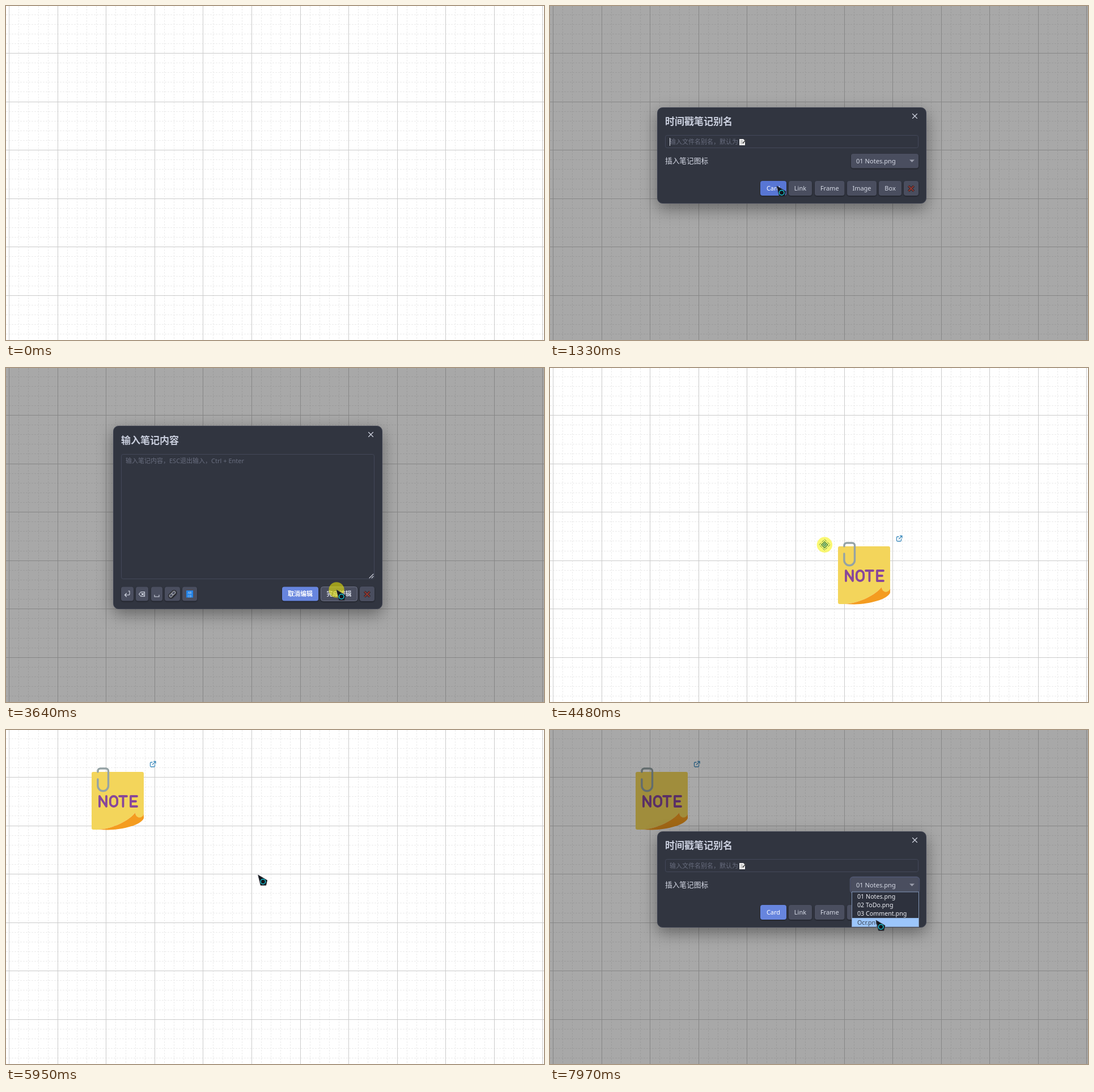
Write an HTML page that moves like this. It is 949 px wide and 590 px high and loops after 8 s.

```html
<!DOCTYPE html>
<html lang="zh">
<head>
<meta charset="utf-8">
<style>
html, body { margin: 0; width: 100%; height: 100%; overflow: hidden; background: #fff; }
svg { display: block; width: 949px; height: 590px; }
text { font: 11px "Noto Sans", "Noto Sans CJK SC", "Noto Sans CJK", sans-serif; fill: #d5d9e5; white-space: pre; }
.title { font-size: 17px; font-weight: 700; fill: #cbd0df; }
.label { font-size: 12.7px; font-weight: 500; }
.hint { fill: #686d7e; }
.btn text { font-weight: 500; text-anchor: middle; }
.btn rect { fill: #4a4e5f; filter: drop-shadow(0 1px 1px #0007); }
.btn.primary rect { fill: #6785de; }
.btn.primary text { fill: #fff; }
.btn.primary.hover rect { fill: #5876d4; }
.btn.outlined rect { stroke: #6b7084; }
.btn.bold text { font-weight: 700; }
.panel { fill: #313540; stroke: #3f4352; filter: drop-shadow(0 9px 14px #0006); }
.field { fill: none; stroke: #434859; }
.glow { fill: none; stroke: #50566f; stroke-width: 2.4; }
.icon { fill: none; stroke: #d5d9e5; stroke-width: 1.1; stroke-linecap: round; stroke-linejoin: round; }
.caret { stroke: #dfe2ea; }
</style>
</head>
<body>
<svg id="stage" viewBox="0 0 949 590"></svg>
<script>
const LOOP = 8000;
const FIRST_OPEN = 1260, EDIT_OPEN = 1890, EDIT_PRESS = 3570, EDIT_CLOSE = 3850;
const NOTE_IN = 4050, DRAG_START = 4390, DRAG_END = 4850, DESELECT = 5450;
const SECOND_OPEN = 6350, LIST_OPEN = 7270;
const OPTIONS = ['01 Notes.png', '02 ToDo.png', '03 Comment.png', 'Ocr.png'];

// time, x, y of the pointer tip
const PATH = [
  [70, 556, 500], [800, 386, 305], [1000, 388, 306], [1260, 400, 318], [2600, 400, 318],
  [3360, 548, 402], [3570, 583, 392], [3900, 583, 392], [4270, 555, 360], [DRAG_START, 555, 360],
  [DRAG_END, 198, 119], [5180, 198, 119], [5800, 446, 256], [5950, 444, 256], [6600, 868, 290],
  [6780, 868, 290], [6920, 737, 277], [7200, 600, 270], [7350, 600, 270], [7620, 588, 332],
  [7760, 580, 349], [7900, 575, 336], [LOOP, 575, 336]
];
const CLICKS = [[1660, 1820], [3580, 3760], [DRAG_START, DRAG_END + 40], [7200, 7330]];

const rect = (x, y, w, h, r, cls) =>
  `<rect x="${x}" y="${y}" width="${w}" height="${h}" rx="${r}" class="${cls || ''}"/>`;
const text = (x, y, str, cls = '') => `<text x="${x}" y="${y}" class="${cls}">${str}</text>`;
const path = (d, attrs) => `<path d="${d}" ${attrs}/>`;
const icon = d => path(d, 'class="icon"');
const button = (x, y, w, h, content, cls = '', id = '') => `<g class="btn ${cls}" id="${id}">
  ${rect(x, y, w, h, 4)}${content[0] === '<' ? content : text(x + w / 2, y + h / 2 + 4, content)}</g>`;
const cross = (x, y, r) => `M${x - r} ${y - r}l${2 * r} ${2 * r}M${x + r} ${y - r}l${-2 * r} ${2 * r}`;
const redCross = (y, id) => button(624, y, 26, 26,
  `<g id="${id}" stroke="#8e3833">${path(cross(637, y + 13.5, 4.7), 'stroke="#2b2224" stroke-width="4"')}
  ${path(cross(637, y + 13.5, 4.5), 'stroke-width="2.2"')}</g>`);

function gridLines(step) {
  let d = '';
  for (let x = 5.7 - 85.55; x < 949; x += step) d += `M${Math.floor(x) + .5} 0V590`;
  for (let y = 83.5 - 85.55; y < 590; y += step) d += `M0 ${Math.floor(y) + .5}H949`;
  return d;
}

const grid = path(gridLines(17.11), 'stroke="#ebebeb" stroke-dasharray="3 2"') +
  path(gridLines(85.55), 'stroke="#cbcbcb"');

const foldEdge = 'C190 174 217 160 228 146';
const note = `<g id="note">
  ${path('M154 74H240a3 3 0 0 1 3 3V148C241 158 229 157 228 146C217 160 190 174 163 176H154a3 3 0 0 1-3-3V77a3 3 0 0 1 3-3z', 'fill="#f3d55b"')}
  ${path(`M163 176${foldEdge}C229 157 241 157 243 148V156C238 168 206 176 180 176.5z`, 'fill="#f49c20"')}
  <g fill="none" stroke-linecap="round" stroke-linejoin="round">
  ${path('M162 74V72.5a4.5 4.5 0 0 1 4.5-4.5H176a4.5 4.5 0 0 1 4.5 4.5V98.5a9.3 9.3 0 0 1-18.6 0V87', 'stroke="#95a3a5" stroke-width="3.4"')}
  ${path('M165 135V117L177 135V117M190 117a6.2 6.2 0 0 1 6.2 6.2v5.6a6.2 6.2 0 0 1-12.4 0v-5.6a6.2 6.2 0 0 1 6.2-6.2M200 117H213M206.5 117V135M231 117H220V135H231M220 126H229', 'stroke="#88479a" stroke-width="3.8"')}
  ${path('M258 57H256a1.5 1.5 0 0 0-1.5 1.5V63.500a1.500 1.500 0 0 0 1.500 1.500H261a1.500 1.500 0 0 0 1.500-1.500V61M260.500 55.500H264V59M264 55.500L258.500 61', 'stroke="#3d8bbd" stroke-width="1.3"')}
  </g>
  <g id="selection" fill="none" stroke="#6965db">${rect(141, 64, 112, 115, 0)}</g>
  <g id="handles" fill="#fff" stroke="#6965db">
    ${[[136, 59], [250, 59], [136, 176], [250, 176], [193, 46.500]].map(([x, y]) => rect(x, y, 7, 7, 2)).join('')}
  </g></g>`;

const nameDialog = `<g id="nameDialog">
  ${rect(189.5, 179.5, 474, 169, 9, 'panel')}
  ${icon(cross(643.5, 194.5, 4))}
  ${text(203, 210, '时间戳笔记别名', 'title')}
  ${rect(203.5, 228.5, 446, 22, 3, 'field')}
  <g id="nameGlow">${rect(202.5, 227.5, 448, 24, 4, 'glow')}</g>
  ${text(211, 244, '输入文件名别名，默认为', 'hint')}
  ${path('M334 235H341L344 238V246H334z', 'fill="#f1f1f1"')}
  ${path('M336 238H340M336 240.5H341M336 243H339', 'stroke="#999"')}
  ${path('M340 243L345.500 236', 'stroke="#444" stroke-width="1.5"')}
  ${path('M211.500 233V247', 'class="caret" id="nameCaret"')}
  ${text(203, 278, '插入笔记图标', 'label')}
  <g id="selectFocus">${rect(530, 260, 121, 28, 5, 'glow')}</g>
  ${button(531, 261, 119, 25.5, '<g></g>')}
  <text x="540" y="278" style="font-size:11.1px">01 Notes.png</text>
  ${path('M634 271.500H643L638.500 276z', 'fill="#9a9eac"')}
  ${button(371, 309, 46, 26, 'Card', 'primary', 'card')}
  ${button(421, 309, 41, 26, 'Link')}
  ${button(467, 309, 52.5, 26, 'Frame')}
  ${button(524, 309, 52, 26, 'Image')}
  ${button(580, 309, 40, 26, 'Box')}
  ${redCross(309, 'nameCross')}
  <g id="list">
    <rect x="532.5" y="286" width="118" height="61.5" fill="#2d313d" stroke="#8297b8"/>
    <rect id="choice" x="533" width="117" height="15.2" fill="#9cc6fb"/>
    ${OPTIONS.map((name, i) => `<text class="option" x="542" y="${298 + i * 15.2}" style="font-size:10.7px">${name}</text>`).join('')}
  </g></g>`;

const editDialog = `<g id="editDialog">
  ${rect(189.5, 102.5, 474, 323, 9, 'panel')}
  ${icon(cross(643.5, 117.5, 4))}
  ${text(203, 134, '输入笔记内容', 'title')}
  ${rect(203.5, 152.5, 446, 220, 3, 'field')}
  <g id="editGlow">${rect(202.5, 151.5, 448, 222, 4, 'glow')}</g>
  ${text(211, 167.5, '输入笔记内容，ESC退出输入，Ctrl + Enter', 'hint')}
  ${path('M211.500 156V171', 'class="caret" id="editCaret"')}
  ${icon('M641 371L648 364M645 371L648 368')}
  ${button(203, 386.5, 22, 25, icon('M218 394V399a2 2 0 0 1-2 2H210M212.500 398L209.500 401L212.500 404M218 394H216'))}
  ${button(229, 386.5, 22, 25, icon('M238 395.500H244.500V403.500H238L234.500 399.500zM239 397.500L243 401.500M243 397.500L239 401.500'))}
  ${button(256, 386.5, 20, 25, icon('M262 401V404H270V401'))}
  ${button(280, 386.5, 27, 25, `<g transform="rotate(-45 293.500 399.500)" fill="none" stroke="#111" stroke-width="3.400">
    ${rect(287, 397, 7, 5, 2.5)}${rect(293, 397, 7, 5, 2.5)}
    <g stroke="#b9bdc6" stroke-width="1.200">${rect(287, 397, 7, 5, 2.5)}${rect(293, 397, 7, 5, 2.5)}</g></g>`)}
  ${button(311, 386.5, 26, 25, `${path('M318 393H330V405.500H318z', 'fill="#2384e8"')}
    <text x="324" y="398.500" style="font-size:5px">AB</text><text x="324" y="404.500" style="font-size:5px">CD</text>`)}
  ${button(487, 386.5, 64, 25, '取消编辑', 'primary bold')}
  ${button(555.5, 386.5, 64, 25, '完成编辑', 'bold', 'done')}
  ${redCross(386, 'editCross')}</g>`;

const pointer = `<g id="pointer">
  <circle id="press" r="13.7" fill="#f6f200" fill-opacity=".55"/>
  <g id="arrow">
    ${path('M0 0L16 9.500L14 18.300H4.500z', 'fill="#14171d" stroke="#343840" stroke-width=".8"')}
    <circle id="ring" cx="8.700" cy="11.700" r="4.300" fill="#10161b" stroke-width="1.500"/>
  </g>
  <g id="mover" fill="none" stroke="#3f7f3c">
    ${path('M0-9.500L9.500 0L0 9.500L-9.500 0z', 'stroke-dasharray="5 1.700" stroke-width=".9"')}
    ${path('M0-5.500L5.500 0L0 5.500L-5.500 0z', 'stroke="#24713a" stroke-width="1.200"')}
    ${path('M0-2.300L2.300 0L0 2.300L-2.300 0z', 'stroke="#177a6a" stroke-width="1.200"')}
  </g></g>`;

const stage = document.getElementById('stage');
stage.innerHTML = grid + note + '<rect id="shade" width="949" height="590" fill-opacity=".34"/>' +
  nameDialog + editDialog + pointer;

const el = id => document.getElementById(id);
const show = (id, on) => { el(id).style.display = on ? '' : 'none'; };
const within = (t, a, b) => t >= a && t < b;
const blink = age => age % 1060 < 530;
const clamp = (v, lo, hi) => Math.min(hi, Math.max(lo, v));

function pointerAt(t) {
  const i = clamp(PATH.findIndex(p => p[0] > t), 1, PATH.length - 1);
  const [t0, x0, y0] = PATH[i - 1], [t1, x1, y1] = PATH[i];
  const k = clamp((t - t0) / (t1 - t0), 0, 1);
  return [x0 + (x1 - x0) * k, y0 + (y1 - y0) * k];
}

function draw(t) {
  const first = within(t, FIRST_OPEN, EDIT_OPEN), second = t >= SECOND_OPEN;
  const editing = within(t, EDIT_OPEN, EDIT_CLOSE);
  const [x, y] = pointerAt(t);

  show('shade', first || second || editing);
  show('nameDialog', first || second);
  show('editDialog', editing);

  const opened = first ? FIRST_OPEN : SECOND_OPEN;
  const listOpen = t >= LIST_OPEN;
  show('nameGlow', t > opened + 140 && !listOpen);
  show('nameCaret', !listOpen && blink(t - opened));
  show('selectFocus', listOpen);
  show('list', listOpen);
  el('card').classList.toggle('hover', first);
  el('nameCross').setAttribute('stroke', second ? '#cf8029' : '#8e3833');
  const row = clamp(Math.floor((y - 286.5) / 15.2), 0, 3);
  el('choice').setAttribute('y', 286.5 + row * 15.2);
  document.querySelectorAll('.option').forEach((o, i) => { o.style.fill = i === row ? '#3a4350' : '#eceef4'; });

  show('editGlow', t < EDIT_PRESS);
  show('editCaret', t < EDIT_PRESS && blink(t - EDIT_OPEN));
  el('done').classList.toggle('outlined', t > 3430);

  // The note trails the pointer by a short lag while dragged.
  const left = 1 - clamp((t - DRAG_START - 95) / (DRAG_END - DRAG_START), 0, 1);
  show('note', t >= NOTE_IN);
  el('note').setAttribute('transform', `translate(${357 * left} ${241 * left})`);
  show('selection', left < 1 && t < DESELECT);
  show('handles', left === 0 && t < DESELECT);

  const moving = within(t, 4200, 5260);
  show('pointer', t >= 70);
  el('pointer').setAttribute('transform', `translate(${x} ${y})`);
  show('press', CLICKS.some(([a, b]) => within(t, a, b)));
  show('arrow', !moving);
  show('mover', moving);
  el('ring').setAttribute('stroke', within(t, SECOND_OPEN, 7150) ? '#e3f0ee' : '#19c3d3');
}

const start = performance.now();
function tick() {
  draw((performance.now() - start) % LOOP);
  requestAnimationFrame(tick);
}
tick();
</script>
</body>
</html>
```
